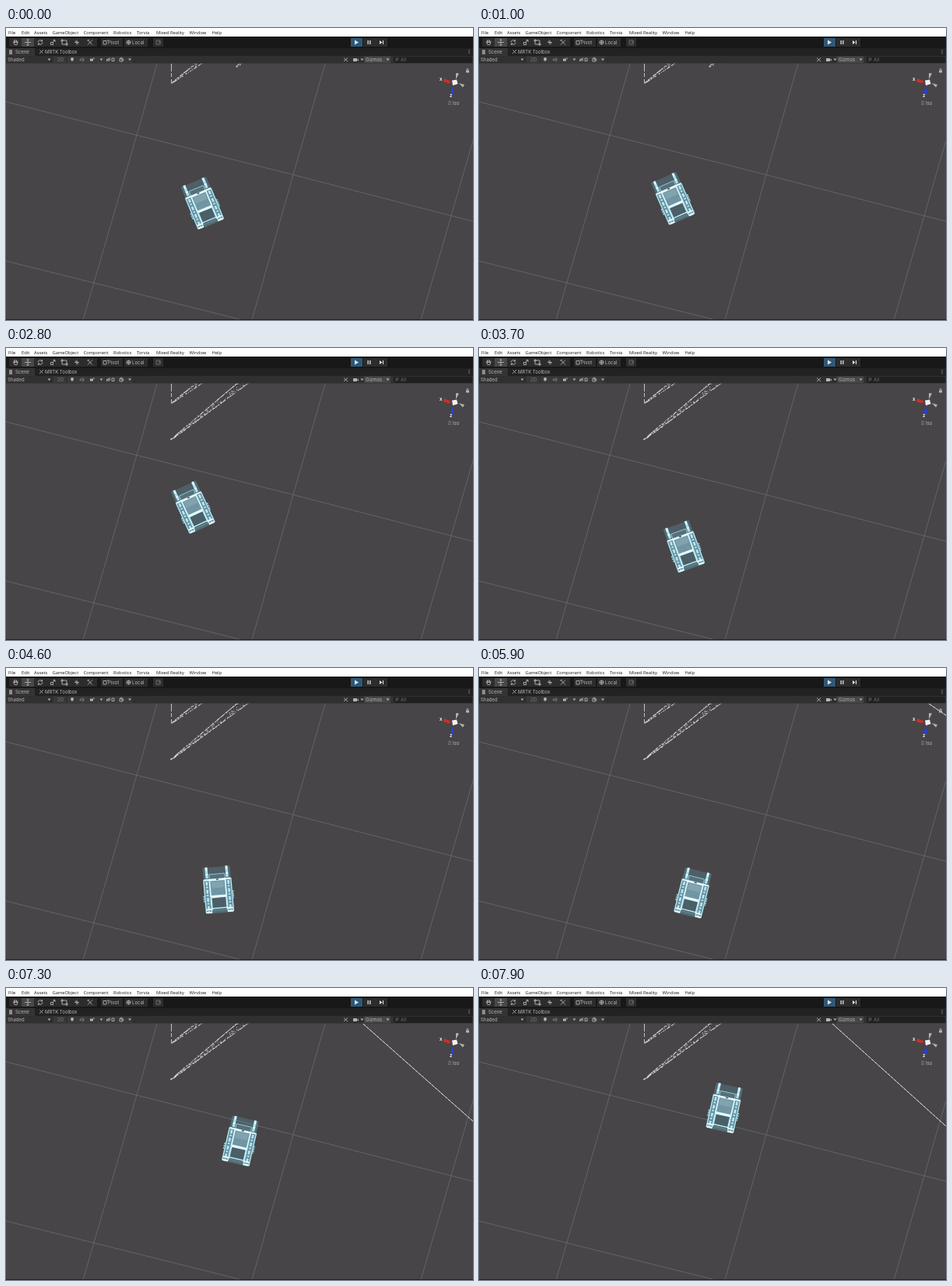
Recreate the animation shown at these times as an HTML page. Size 600 by 376 pixels, loop 8 s.

```html
<!DOCTYPE html>
<html lang="en">
<head>
<meta charset="utf-8">
<title>Scene editor</title>
<style>
html, body { margin: 0; height: 100%; overflow: hidden; background: #474547; }
svg { display: block; width: 600px; height: 376px; }
text { font: 5.8px "Open Sans", "Noto Sans", sans-serif; }
.ui text { font: 6px Inter, Roboto, sans-serif; fill: #b8b8b8; }
.icon { fill: none; stroke: #b4b4b4; stroke-width: .9; }
.dim { opacity: .5; }
</style>
</head>
<body>
<svg viewBox="0 0 600 376">
  <defs><clipPath id="view"><rect y="45.5" width="600" height="329.5"/></clipPath></defs>
  <rect width="600" height="376" fill="#474547"/>

  <g clip-path="url(#view)">
    <path d="M0 95L168 138L369 189L600 249M0 300L304 376M194 46L168 138L99 376M410 46L369 189L316 376M600 145L533 376" fill="none" stroke="#6d6b6d" stroke-width=".8"/>
    <g fill="none" stroke="#e4e4e4" stroke-width=".8">
      <path id="edge"/>
      <path id="hint"/>
      <path id="strip"/>
      <path id="ray" stroke="#f0f0f0" stroke-width="1" stroke-dasharray="5 .6"/>
    </g>
    <g id="robot" stroke-linejoin="round">
      <path d="M-15-29V-16H15V-29M-16-13H16V28H-16Z" fill="#69b9d3" fill-opacity=".22" stroke="#74c8e2" stroke-opacity=".28" stroke-width="5"/>
      <path d="M-10-20H10V-13H-10Z" fill="#55707a" stroke="#9cd5e5" stroke-width=".8"/>
      <path d="M-17.5-13h7v42h-7zM10.500-13h7v42h-7z" fill="#5f8e9f" stroke="#b4e9f6" stroke-width="1.300"/>
      <path d="M-10-12H10V8H-10Z" fill="#7195a2" stroke="#d5f5fc" stroke-width="1.500"/>
      <path d="M-8-10H8V-2H-8Z" fill="#8eb0bb" opacity=".55"/>
      <path d="M-9.500 10H9.500V24H-9.500Z" fill="#4b5f68" stroke="#c9f1fa" stroke-width="1.300"/>
      <path d="M-14-11V28M14-11V28" stroke="#defaff" stroke-width="2.600" stroke-dasharray="5 1.500 2 2" opacity=".8"/>
      <path d="M-13-29.500V-15M13-29.500V-15" stroke="#a8e3f2" stroke-width="3.200"/>
      <path d="M-13-29V-25M13-29V-25M-14.500-20H-11.500M11.500-20H14.500" stroke="#effdff" stroke-width="1.800"/>
      <path d="M-17-13H17M-10 9H10M-17 25H-9M9 25H17M-17 29H-10M10 29H17" stroke="#eafcff" stroke-width="2"/>
      <path d="M-19 7V15M19 3V13" stroke="#9bdcf0" stroke-width="1.500" stroke-dasharray="2 1"/>
      <path d="M-1.500-13H1.500" stroke="#2e5564" stroke-width="1.500"/>
    </g>
  </g>

  <g class="ui">
    <!-- toolbar -->
    <rect y="11" width="600" height="15" fill="#181818"/>
    <path d="M4 13H117V24H4ZM122 13H150V24H122ZM152 13H182V24H152ZM189 13H202V24H189ZM459 13H490V24H459Z" fill="#2c2c2c"/>
    <rect x="20" y="13" width="16" height="11" fill="#484848"/>
    <rect x="443" y="13" width="15" height="11" fill="#2d5878"/>
    <path d="M448 15.500L453 18.500L448 21.500ZM464.500 16h1.300v5h-1.300zM467.200 16h1.300v5h-1.300zM480 16l3.500 2.500L480 21zM484 16h1v5h-1z" fill="#e4e4e4"/>
    <path d="M10 19L9 17.500M10.500 18.500V15.500M12 18V15M13.500 18V15.500M15 18.500V16.500M10 18.500H15L14 21.500H11Z" class="icon"/>
    <path d="M24 18.500H32M28 14.500V22.500M26.800 15.800L28 14.500L29.200 15.800M26.800 21.200L28 22.500L29.200 21.200" class="icon"/>
    <path d="M41 18.500A3 3 0 0 1 46.500 17M47 18.500A3 3 0 0 1 41.500 20M46.500 15V17H44.500M41.500 22V20H43.500" class="icon"/>
    <path d="M57.500 21.500V18.500H60.500V21.500ZM60 18L63 15.500M60.500 15.500H63V18" class="icon"/>
    <path d="M72 16H78V21H72ZM71 15h2v2h-2zM77 20h2v2h-2z" class="icon"/>
    <path d="M88 18.500H94M91 15.500V21.500M89 16.500L93 20.500" class="icon"/>
    <path d="M105 15.500L111 21.500M111 15.500L105 21.500M104.500 16.500L107 15" class="icon"/>
    <path d="M125 16.500H129V21H125ZM131 15V17" class="icon" stroke="#c78764"/>
    <path d="M155 18.500a2.500 2.500 0 1 0 5 0a2.500 2.500 0 1 0-5 0M157.500 16V21M155 18.500H160" class="icon"/>
    <path d="M193 16H198V21H193ZM195 18H199" class="icon dim"/>
    <text x="131" y="20.800">Pivot</text><text x="162" y="20.800">Local</text>

    <!-- tabs -->
    <rect y="26" width="600" height="10" fill="#222"/>
    <rect y="26" width="37" height="10" fill="#343434"/>
    <path d="M4 29H8M4 31H8M4 33H8M5 28V34M7 28V34" class="icon"/>
    <path d="M43 33L48 28M43.500 28.500L47.500 32.500" class="icon"/>
    <text x="12" y="33">Scene</text><text x="50" y="33">MRTK Toolbox</text>
    <path d="M594.500 28h1v1h-1zm0 2h1v1h-1zm0 2h1v1h-1z" fill="#b4b4b4"/>

    <!-- view controls -->
    <rect y="36" width="600" height="9.500" fill="#303030"/>
    <path d="M61 36.500H77V45H61ZM79 36.500H162V45H79Z" fill="#393939"/>
    <rect x="460" y="36.500" width="34" height="8.500" fill="#464646"/>
    <rect x="498" y="37" width="101" height="8" rx="2" fill="#202020"/>
    <text x="2" y="42.800">Shaded</text><text x="66" y="42.800" class="dim">2D</text>
    <text x="462" y="42.800">Gizmos</text><text x="507" y="42.800" class="dim">All</text>
    <path d="M53.500 39.500h4l-2 2.500zM120.500 39.500h4l-2 2.500zM157 39.500h4l-2 2.500zM455.500 39.500h4l-2 2.500zM488.500 39.500h4l-2 2.500zM83 40a2 2 0 1 1 4 0L86 42.500H84ZM108 39.500h4v3h-4zM446 39h5v4h-5zM451 41l2-1.500v3z" fill="#b4b4b4"/>
    <path d="M95 40H97L99 38.500V43L97 41.500H95ZM100 39.500V42" class="icon dim"/>
    <path d="M112 38L114 40M129 41Q131.500 38 134 41Q131.500 43.500 129 41M129 43L134 38M136 39H139V42.500H136ZM146 39H150V43H146ZM148 37.500V41H151.500" class="icon"/>
    <path d="M434 43L439 38.500M434 38.500L439 43" class="icon"/>
    <path d="M501 40a1.500 1.500 0 1 0 3 0a1.500 1.500 0 1 0-3 0M501.500 41.500L500 43" class="icon dim"/>

    <!-- orientation gizmo -->
    <path d="M578 58L582 58.500L578 66ZM582 71L589 73L587 76.500Z" fill="#b3b3b3"/>
    <path d="M563 65L571 68.500L570 71.500L562 69Z" fill="#d42c24"/>
    <path d="M574.500 75L576 83.500Q573.500 85.500 571 83Z" fill="#2740d8"/>
    <path d="M573 67.500L579 66.500L580.500 72L574 74Z" fill="#f0f0f0"/>
    <text x="557" y="68" style="fill:#fff;font-weight:600">x</text>
    <text x="570" y="89" style="fill:#fff;font-weight:600">z</text>
    <text x="574" y="98.500">Iso</text>
    <path d="M568 94.500H572M568 96.500H572M568 98.500H572" class="icon dim"/>
    <path d="M591 54.500h4v3h-4z" fill="#b4b4b4"/><path d="M592 54.500V53Q593 51.500 594 53V54.500" class="icon"/>
    <rect y="375" width="600" height="1" fill="#222"/>
  </g>

  <rect width="600" height="11" fill="#fff"/>
  <g fill="#151515">
    <text x="3" y="7.800">File</text><text x="20" y="7.800">Edit</text>
    <text x="36" y="7.800">Assets</text><text x="59.500" y="7.800">GameObject</text>
    <text x="99.500" y="7.800">Component</text><text x="138" y="7.800">Robotics</text>
    <text x="168" y="7.800">Torvia</text><text x="193" y="7.800">Mixed Reality</text>
    <text x="235.500" y="7.800">Window</text><text x="264.500" y="7.800">Help</text>
  </g>
</svg>

<script>
const $ = id => document.getElementById(id);

let seed = 7;
const rand = () => (seed = seed * 16807 % 2147483647) / 2147483647;

// Speckled wedge from (x0, y0) to (x1, y1), widening to the right.
function speckle(x0, y0, x1, y1, w0, w1, n) {
  let d = "";
  for (let i = 0; i < n; i++) {
    const k = i / n, r = rand();
    const side = r < .4 ? 0 : r < .75 ? 1 : rand();
    const x = x0 + (x1 - x0) * k + side * (w0 + (w1 - w0) * k);
    const y = y0 + (y1 - y0) * k;
    d += `M${x.toFixed(1)} ${y.toFixed(1)}h${(.6 + rand()).toFixed(1)}`;
  }
  return d;
}

$("edge").setAttribute("d", "M212.500 46V56M212.500 58V63M212.500 66V70" + speckle(212, 71, 244, 45, 1, 8, 90));
$("hint").setAttribute("d", speckle(295, 50, 300, 45, 1, 5, 14));
$("strip").setAttribute("d", speckle(211, 118, 297, 45, 1, 14, 330));

// time, x, y, heading in degrees
const poses = [
  [0, 252, 225, -22.5], [900, 250, 221, -23.5], [1400, 237, 200, -26],
  [1800, 224, 179, -28], [2000, 224, 179, -28], [2700, 237.5, 200, -25],
  [3600, 261.6, 252, -21], [3700, 263, 255, -20], [4600, 272.5, 285, -5],
  [5400, 272, 297, 9], [5900, 275, 289, 14], [6300, 279, 271, 14],
  [6700, 286.5, 245, 13], [7200, 299, 204, 13], [7900, 315.7, 154, 12.6]
];

// time, x on the top edge, y on the right edge
const rays = [[5700, 600, 46], [5900, 578, 61], [6700, 466, 162], [7900, 454, 178]];

// Smooth monotone interpolation through the keys.
function sample(keys, t) {
  const last = keys.length - 2;
  let i = 0;
  while (i < last && keys[i + 1][0] <= t) i++;
  const [a, b] = [keys[i], keys[i + 1]];
  const span = b[0] - a[0], k = Math.min(1, Math.max(0, (t - a[0]) / span));
  const slope = (j, c) => (keys[j + 1][c] - keys[j][c]) / (keys[j + 1][0] - keys[j][0]);
  const tangent = (j, c) => {
    if (j === 0) return slope(0, c);
    if (j > last) return slope(last, c);
    const p = slope(j - 1, c), q = slope(j, c);
    return p * q > 0 ? 2 * p * q / (p + q) : 0;
  };
  return a.slice(1).map((v, n) => {
    const c = n + 1, w = b[c], s = k * k * (3 - 2 * k);
    return v + (w - v) * s
      + span * k * (1 - k) * ((1 - k) * tangent(i, c) - k * tangent(i + 1, c));
  });
}

function draw(now) {
  const t = Math.floor(now % 8000 / 100) * 100;
  const [x, y, angle] = sample(poses, t);
  $("robot").setAttribute("transform", `translate(${x} ${y}) rotate(${angle})`);
  $("hint").style.display = t < 1300 ? "" : "none";
  $("strip").style.display = t < 1300 ? "none" : "";
  const [top, right] = sample(rays, t);
  $("ray").setAttribute("d", t > 5700 ? `M${top} 46L600 ${right}` : "");
  requestAnimationFrame(draw);
}
requestAnimationFrame(draw);
</script>
</body>
</html>
```
